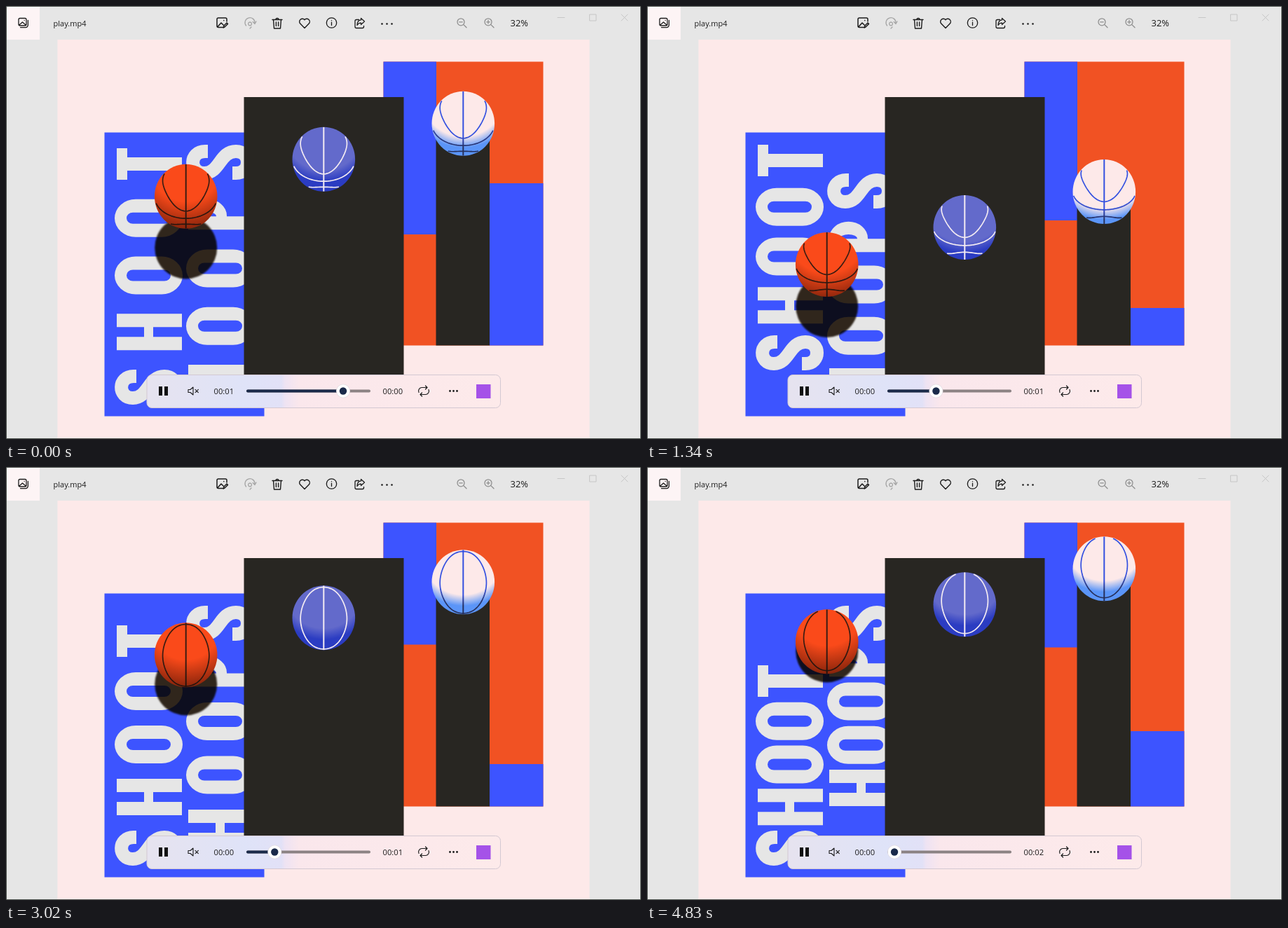
An HTML page with a canvas for the animation above (4960 ms loop, 906 px wide and 618 px high).

```html
<!DOCTYPE html>
<html>
<head>
<meta charset="utf-8">
<style>
html, body { margin: 0; width: 100%; height: 100%; overflow: hidden; background: #e6e6e6; }
canvas { display: block; }
</style>
</head>
<body>
<canvas id="stage" width="906" height="618"></canvas>
<script>
const c = document.getElementById('stage').getContext('2d');
const LOOP = 4960, PERIOD = 2140, BOUNCE = 1540;
const BLUE = '#3d54ff', ORANGE = '#f15223', DARK = '#282622', PINK = '#fde9e9', GREY = '#e6e6e6';
const mod = (a, n) => ((a % n) + n) % n;
const rad = d => d * Math.PI / 180;

function rect(x, y, w, h, color) {
  c.fillStyle = color;
  c.fillRect(x, y, w, h);
}
function disc(x, y, r, color) {
  c.fillStyle = color;
  c.beginPath();
  c.arc(x, y, r, 0, 7);
  c.fill();
}
function label(s, x, y, size) {
  c.font = size + 'px "Open Sans", "Noto Sans", sans-serif';
  c.fillStyle = '#1b1b1b';
  c.fillText(s, x, y);
}
function icon(x, y, d, color = '#1b1b1b', width = 1.3) {
  c.save();
  c.translate(x, y);
  c.strokeStyle = color;
  c.lineWidth = width;
  c.lineCap = c.lineJoin = 'round';
  c.stroke(new Path2D(d));
  c.restore();
}

// Smooth periodic curves: values at these moments after a bounce
const KEYS = [118, 452, 600, 1150, 1484, 1560, 1947];
const CURVES = {
  spin:   [-68, 10, 43, 80, 92, 108, 214],
  shadow: [454, 389, 345, 263, 310, 332, 428.5],
  left:   [404, 377, 326, 257.5, 253.5, 257.5, 306],
  right:  [402.5, 310, 253, 377, 424, 429.5, 431],
  sinkT:  [0, 0, 5, 85, 28, 11, 0],
  liftS:  [79, 6, 0, 0, 0, 0, 49],
  sinkS:  [77, 6, 0, 0, 0, 0, 41]
};
function curve(name, phase, gain = 0) {
  const n = KEYS.length, p = KEYS[0] + mod(phase - KEYS[0], PERIOD);
  const T = i => KEYS[mod(i, n)] + PERIOD * Math.floor(i / n);
  const V = i => CURVES[name][mod(i, n)] + gain * Math.floor(i / n);
  const slope = i => (V(i + 1) - V(i - 1)) / (T(i + 1) - T(i - 1));
  let i = 0;
  while (p >= T(i + 1)) i++;
  const d = T(i + 1) - T(i), u = (p - T(i)) / d, w = 1 - u;
  return V(i) * w * w * (1 + 2 * u) + V(i + 1) * u * u * (3 - 2 * u)
    + d * u * w * (slope(i) * w - slope(i + 1) * u);
}

// Poster lettering, reading upwards
const GLYPHS = {
  H: [52, 'M0 3H19V42H33V3H52V96H33V55H19V96H0Z'],
  O: [54, 'M0 30a27 30 0 0 1 54 0V67a27 30 0 0 1 -54 0ZM19 26a8 9 0 0 1 16 0V71a8 9 0 0 1 -16 0Z'],
  T: [45, 'M0 3H45V18H32V96H13V18H0Z'],
  P: [43, 'M0 3H20a23 27 0 0 1 0 55H19V96H0ZM19 18a6 12 0 0 1 0 25Z'],
  S: [50, 'M40.5 31V27C40.5 4 9.5 4 9.5 26C9.5 48 40.5 48 40.5 71C40.5 93 9.5 93 9.5 71V66']
};
function word(s, x, bottom, top) {
  const total = [...s].reduce((sum, ch) => sum + GLYPHS[ch][0], 0);
  const gap = (bottom - top - total) / (s.length - 1);
  c.save();
  c.translate(x, bottom);
  c.rotate(-Math.PI / 2);
  c.fillStyle = c.strokeStyle = GREY;
  c.lineWidth = 19;
  for (const ch of s) {
    const [w, d] = GLYPHS[ch], path = new Path2D(d);
    if (ch === 'S') c.stroke(path);
    else c.fill(path, 'evenodd');
    c.translate(w + gap, 0);
  }
  c.restore();
}

const RX = 44.8, RY = 46;
// Draws the part of a line on the sphere that faces us; f gives [x, angle]
function seam(f) {
  let down = false;
  c.beginPath();
  for (let i = 0; i <= 80; i++) {
    const [x, a] = f(i / 80), p = Math.sqrt(Math.max(0, 1 - x * x));
    const facing = p * Math.cos(a) > .18;
    if (facing) c[down ? 'lineTo' : 'moveTo'](x * RX, p * Math.sin(a) * RY);
    down = facing;
  }
  c.stroke();
}
function ball(x, y, spin, r0, r1, colors, lines) {
  const shade = ([a, b]) => {
    const g = c.createRadialGradient(0, -42, r0, 0, -42, r1);
    g.addColorStop(0, a);
    g.addColorStop(1, b);
    return g;
  };
  c.save();
  c.translate(x, y);
  c.beginPath();
  c.ellipse(0, 0, RX, RY, 0, 0, 7);
  c.fillStyle = shade(colors);
  c.fill();
  c.clip();
  c.strokeStyle = shade(lines);
  c.lineWidth = 2;
  c.beginPath();
  c.moveTo(0, -RY);
  c.lineTo(0, RY);
  c.stroke();
  c.lineWidth = 1.7;
  for (const turn of [0, 180]) {
    const a = rad(spin + turn);
    seam(u => [2 * u - 1, a]);
    seam(u => [.74 * Math.sin(u * 2 * Math.PI), a - rad(90) + rad(74) * Math.cos(u * 2 * Math.PI)]);
  }
  c.restore();
}

function rings(since) {
  c.save();
  c.beginPath();
  c.rect(340, 130, 227, 404);
  c.clip();
  c.lineWidth = 1.1;
  for (let i = 0; i < 4; i++) {
    const u = (since + 22 - i * 30.7) / 230;
    if (u <= 0 || u >= 1) continue;
    c.globalAlpha = Math.min(.85, 1.2 * (1 - u));
    c.strokeStyle = i % 2 ? ORANGE : BLUE;
    c.beginPath();
    c.arc(454, 429, 100 * (1 - (1 - u) ** 3), 0, 7);
    c.stroke();
  }
  c.restore();
}

function posters(t) {
  const ph = mod(t - BOUNCE, PERIOD), half = PERIOD / 2;
  const fall = mod(ph - 10, PERIOD); // the ball lands slightly after the beat
  const low = (1 - Math.min(fall, PERIOD - fall) / half) ** (fall < half ? 2.7 : 2.4);
  const y = 249 + 199 * low;
  const spin = curve('spin', ph, 360);
  const at = name => Math.max(0, curve(name, ph));
  const edge = 68 + 11 * low;

  // Right poster
  rect(538.5, 79.5, 228, 405, ORANGE);
  rect(538.5, 79.5, 75.5, curve('left', ph) - 79.5, BLUE);
  const split = curve('right', ph);
  rect(690, split, 76.5, 484.5 - split, BLUE);
  rect(613.5, y - 104, 76.5, 588.5 - y, DARK);
  ball(652.3, y - 104, spin, edge - 9, edge + 7, [PINK, '#5b95f8'], ['#3350e0', '#26305c']);

  // Left poster
  rect(140.5, 180.5, 228, 405, BLUE);
  word('SHOOT', 155, 569 - at('liftS'), 198 + at('sinkT'));
  word('HOOPS', 257, 569 - at('sinkT'), 198 + at('sinkS'));
  c.save();
  c.globalCompositeOperation = 'multiply';
  c.filter = 'blur(1px)';
  disc(256.7, curve('shadow', ph), 44.5, '#352a1f');
  c.restore();
  ball(256.7, y, spin, 48 + 10 * low, 92 + 6 * low, ['#fa4a1a', '#7c200a'], ['#3a1c12', '#22120c']);

  // Middle poster
  rect(339.5, 130, 228, 405, DARK);
  rings(ph);
  ball(453.3, y - 53, spin, edge - 12, edge + 4, ['#636acb', '#2b3cc2'], ['#f3ebf2', '#f3ebf2']);
}

// Slider position: [time, x]; it jumps back whenever the clip restarts
const SLIDER = [[0, 481], [530, 512], [530, 352], [960, 374], [1340, 412], [1990, 450.5], [2670, 512],
  [2670, 352], [3020, 383], [3800, 440.5], [4810, 512], [4810, 351.5], [4960, 363]];
function sliderX(t) {
  const i = SLIDER.findIndex(k => k[0] > t), [t0, a] = SLIDER[i - 1], [t1, b] = SLIDER[i];
  return a + (b - a) * (t - t0) / (t1 - t0);
}

function dots(x, y, gap, r) {
  for (const k of [-1, 0, 1]) disc(x + k * gap, y, r, '#1b1b1b');
}

function player(t) {
  const x = sliderX(t), g = c.createLinearGradient(201, 0, 706, 0);
  [[0, '#e6e3ef'], [.28, '#dfe3f8'], [.38, '#e2e1f7'], [.39, '#eee3f3'], [.43, '#fae7ec'], [1, '#fdeaea']]
    .forEach(s => g.addColorStop(...s));
  c.beginPath();
  c.roundRect(201, 526.5, 504.5, 47, 7);
  c.fillStyle = g;
  c.fill();
  c.strokeStyle = '#d3c8d2';
  c.lineWidth = 1;
  c.stroke();
  rect(218, 543, 5, 13, '#111');
  rect(226, 543, 5, 13, '#111');
  icon(267, 549.5, 'M-7 -2H-4L0 -5.5V5.5L-4 2H-7ZM3 -2.2L7.4 2.2M7.4 -2.2L3 2.2', '#1b1b1b', 1.1);
  label(x > 426 ? '00:01' : '00:00', 296.5, 554, 11.2);
  label(x > 426 ? '00:00' : x > 365 ? '00:01' : '00:02', 537.5, 554, 11.2);
  c.lineCap = 'round';
  c.lineWidth = 4;
  for (const [from, to, color] of [[345, 518, '#8b8283'], [345, x, '#1a2a4a']]) {
    c.strokeStyle = color;
    c.beginPath();
    c.moveTo(from, 549.5);
    c.lineTo(to, 549.5);
    c.stroke();
  }
  c.lineCap = 'butt';
  disc(x, 549.5, 10, '#e3dce2');
  disc(x, 549.5, 9.3, '#fff');
  disc(x, 549.5, 5.2, '#1a2a4a');
  icon(596, 549.5, 'M-7 2A5 5 0 0 1 -3 -5H5M2.5 -7.5L5 -5L2.5 -2.5M7 -2A5 5 0 0 1 3 5H-5M-2.5 7.5L-5 5L-2.5 2.5', '#1b1b1b', 1.2);
  dots(638.5, 549.5, 5, 1.4);
  rect(671, 540, 20.5, 20, '#a552e8');
}

function chrome() {
  rect(0, 0, 906, 618, GREY);
  rect(1, 1, 47, 47, '#fdf4f5');
  rect(73.5, 48, 759, 570, PINK);
  icon(24, 24, 'M-4 -6.5H3A2 2 0 0 1 5 -4.5V2A2 2 0 0 1 3 4H-4A2 2 0 0 1 -6 2V-4.5A2 2 0 0 1 -4 -6.5ZM-5.4 3.2L-.5 -1L4.4 3.2M2.2 -3.6V-3.5M-3.5 6.6H4A3.5 3.5 0 0 0 7.4 3V-3.5');
  label('play.mp4', 67.5, 29, 11);
  icon(308, 24, 'M2 6.5H-5A2 2 0 0 1 -7 4.5V-5A2 2 0 0 1 -5 -7H5A2 2 0 0 1 7 -5V-2M-6 5.5L-1 0L2 3M2.8 -3.4V-3.3M2 7L3 4L7 0L8.5 1.5L4.5 5.6Z', '#1b1b1b', 1.5);
  icon(348, 24, 'M-5.5 4A7 7 0 1 1 7 0M4.2 -1.5L7 1.5L9 -2M0 3.8A2.4 2.4 0 1 1 .1 3.8M0 8L2 6', '#a6a6a6');
  icon(387, 24.5, 'M-7 -5H7M-5.5 -5L-4.5 7.5H4.5L5.5 -5M-2 -5A2 2 0 0 1 2 -5M-1.6 -1.5V4M1.6 -1.5V4', '#1b1b1b', 1.4);
  icon(426, 24.5, 'M0 7L-6.3 .6A4 4 0 0 1 0 -4.8A4 4 0 0 1 6.3 .6Z', '#1b1b1b', 1.4);
  icon(464.5, 24, 'M7.2 0A7.2 7.2 0 1 1 -7.2 0A7.2 7.2 0 1 1 7.2 0M0 -.8V3.6M0 -3.4V-3.3');
  icon(504.5, 24.5, 'M-1 -5H-4.5A2 2 0 0 0 -6.5 -3V5A2 2 0 0 0 -4.5 7H4A2 2 0 0 0 6 5V4M2 -7L7 -2.5L2 2V-.4C-1 -.4 -2.5 1 -3.5 3C-3.4 -1.5 -1.5 -4.4 2 -4.6Z');
  dots(543.5, 25.5, 7, 1.3);
  const lens = 'M4 -1.2A5 5 0 1 1 -6 -1.2A5 5 0 1 1 4 -1.2M2.6 2.4L7 6.8M-3.3 -1.2H1.3';
  icon(650, 24, lens, '#8f8f8f');
  icon(689, 24, lens + 'M-1 -3.5V1.1', '#8f8f8f');
  label('32%', 719.5, 28.5, 13);
  icon(792, 16.5, 'M-5 0H5', '#c6c6c6', 1);
  icon(837.5, 16.5, 'M-4.5 -4.5H4.5V4.5H-4.5Z', '#c6c6c6', 1);
  icon(882.5, 16.5, 'M-4.5 -4.5L4.5 4.5M4.5 -4.5L-4.5 4.5', '#c6c6c6', 1);
}

// The screen refreshes about eight times a second
function stepped(t) {
  if (t < 320) return t < 100 ? 0 : 100;
  return 960 + 129 * Math.floor((t - 952) / 129);
}

function draw() {
  const t = stepped(performance.now() % LOOP);
  chrome();
  posters(t);
  player(t);
  c.strokeStyle = '#454a46';
  c.lineWidth = 1;
  c.strokeRect(.5, .5, 905, 617);
  requestAnimationFrame(draw);
}
draw();
</script>
</body>
</html>
```
